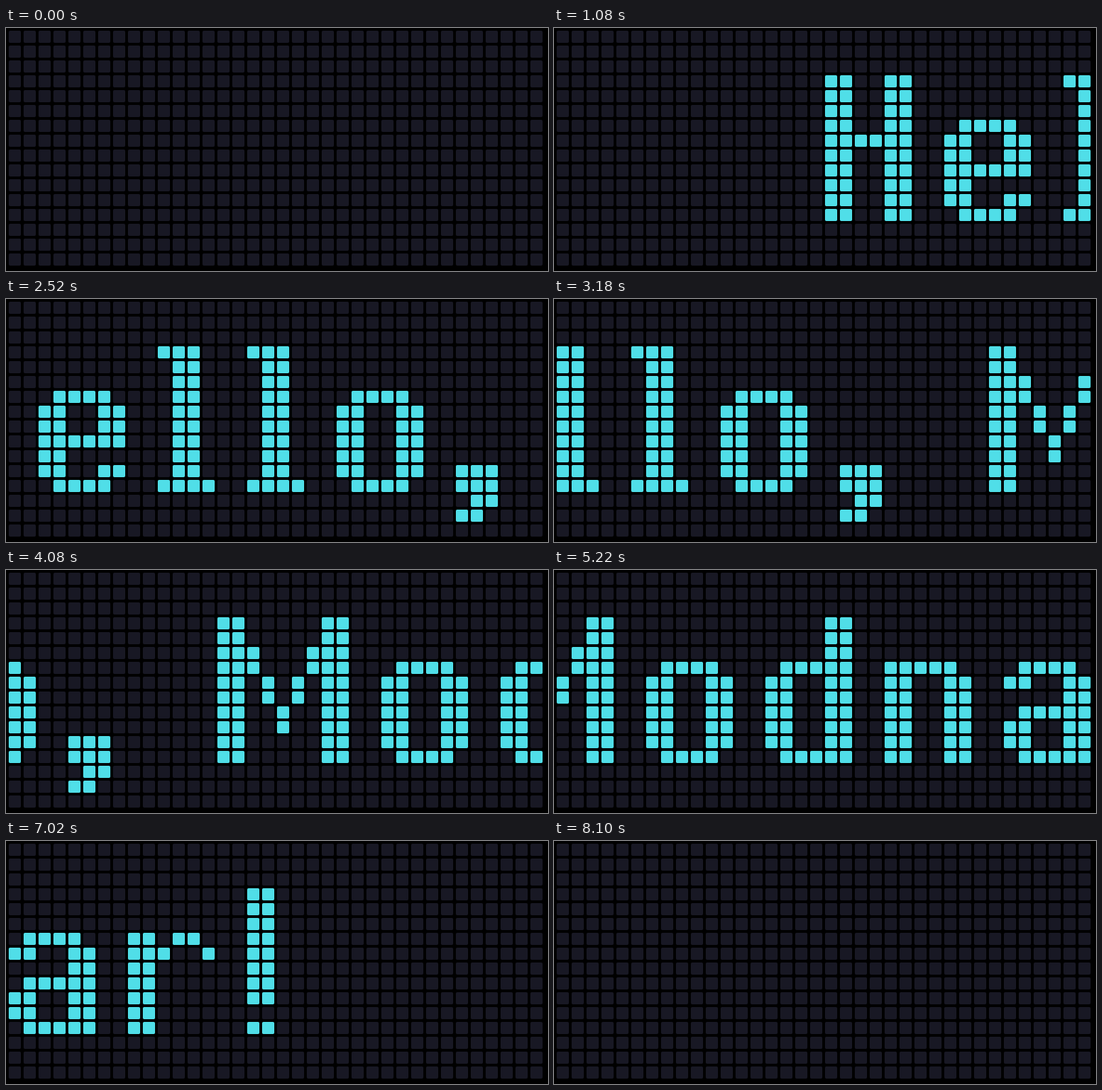
Recreate the animation shown at these times as an HTML page with a canvas. Size 800 px wide and 360 px high, loop 8.28 s.

```html
<!DOCTYPE html>
<html lang="en">
<head>
<meta charset="utf-8">
<title>LED ticker</title>
<style>
  html, body { margin: 0; width: 100%; height: 100%; overflow: hidden; background: #000; }
  canvas { display: block; }
</style>
</head>
<body>
<canvas id="board" width="800" height="360"></canvas>
<script>
const COLS = 36, ROWS = 16, PITCH = 22, MARGIN = 4, LED = 18;
const STEP = 60, LOOP = 8280, GAP = 2;
const OFF = '#181824', ON = '#50dee8';
const MESSAGE = 'Hello, Modnar!';

// Each glyph: first row on the board, then runs of "pattern*count".
const GLYPHS = {
  H: [3, '##..##*4 ###### ##..##*5'],
  e: [6, '.####. ##..##*2 ###### ##.... ##..## .####.'],
  l: [3, '###. .##.*8 ####'],
  o: [6, '.####. ##..##*5 .####.'],
  ',': [11, '###*2 .## ##.'],
  ' ': [3, '...'],
  M: [3, '##.....##*2 ###...###*2 ##.#.#.##*2 ##..#..##*2 ##.....##*2'],
  d: [3, '....##*3 .##### ##..##*5 .#####'],
  n: [6, '#####. ##..##*6'],
  a: [6, '.####. ##..## ....## .##### ##..##*2 .#####'],
  r: [6, '##.##. ###..# ##....*5'],
  '!': [3, '##*8 .. ##']
};

function expand(runs) {
  return runs.split(' ').flatMap(run => {
    const [row, count = 1] = run.split('*');
    return Array(+count).fill(row);
  });
}

// Lay the message out once as a list of lit dots.
const dots = [];
let width = 0;
for (const char of MESSAGE) {
  const [top, runs] = GLYPHS[char];
  const rows = expand(runs);
  rows.forEach((row, y) => [...row].forEach((cell, x) => {
    if (cell === '#') dots.push([width + x, top + y]);
  }));
  width += rows[0].length + GAP;
}
const lastShift = COLS + width - GAP;

const ctx = document.getElementById('board').getContext('2d');

function led(col, row, color) {
  ctx.fillStyle = color;
  ctx.beginPath();
  ctx.roundRect(MARGIN + col * PITCH, MARGIN + row * PITCH, LED, LED, 2);
  ctx.fill();
}

function draw() {
  const shift = Math.min(lastShift, Math.floor(performance.now() % LOOP / STEP));
  const lit = new Set();
  for (const [x, y] of dots) {
    const col = COLS - shift + x;
    if (col >= 0 && col < COLS) lit.add(y * COLS + col);
  }
  ctx.fillStyle = '#000';
  ctx.fillRect(0, 0, 800, 360);
  for (let row = 0; row < ROWS; row++)
    for (let col = 0; col < COLS; col++)
      led(col, row, lit.has(row * COLS + col) ? ON : OFF);
  requestAnimationFrame(draw);
}
draw();
</script>
</body>
</html>
```
